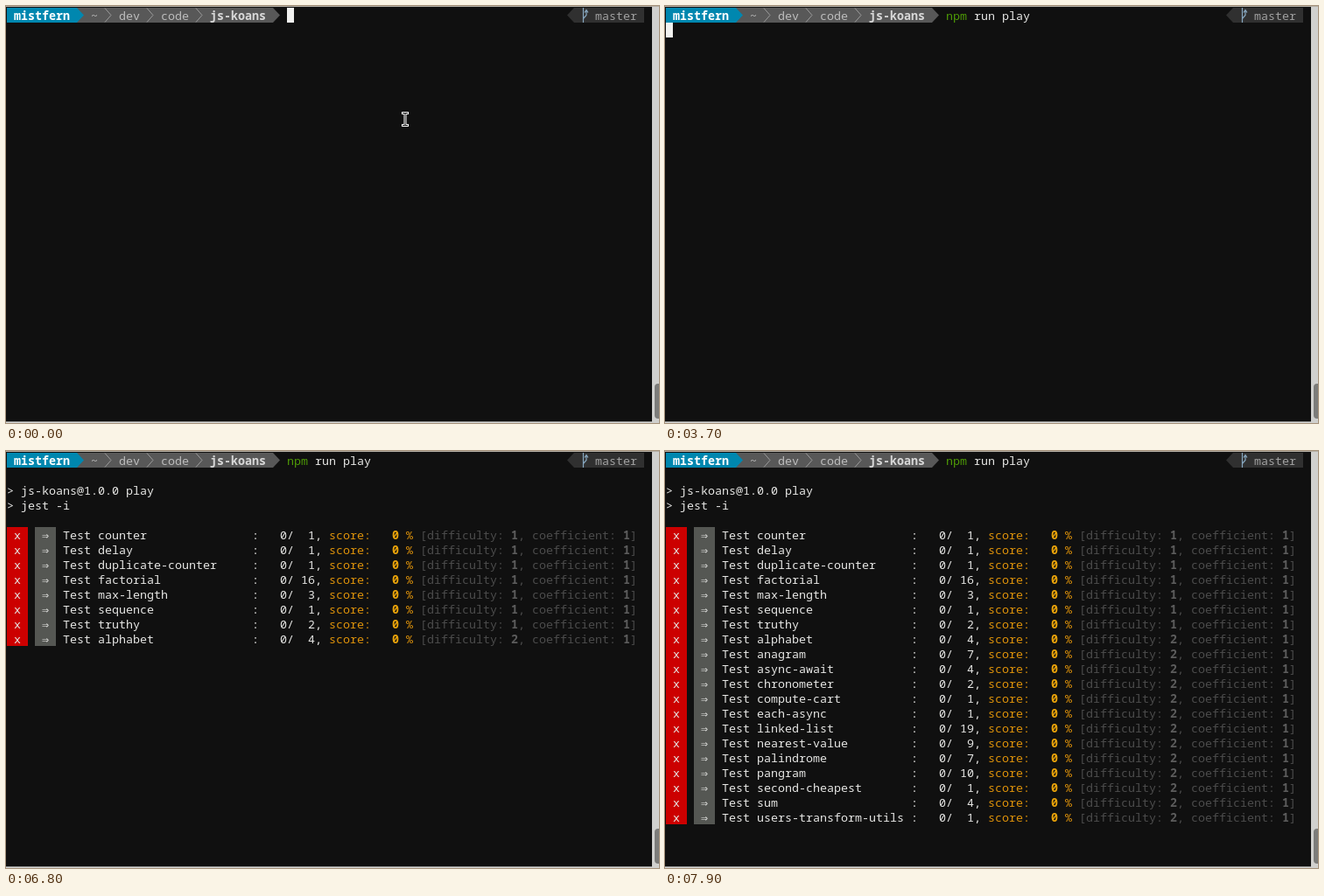
Recreate the animation shown at these times as an HTML page. Size 746 by 477 pixels, loop 8000 ms.

```html
<!DOCTYPE html>
<html lang="en">
<head>
<meta charset="utf-8">
<title>Terminal test run</title>
<style>
html, body { margin: 0; width: 100%; height: 100%; overflow: hidden; background: #101010; }
#stage { position: relative; width: 746px; height: 477px; overflow: hidden; background: #101010;
  font: 13.3333px/18px "Noto Sans Mono", "DejaVu Sans Mono", monospace; color: #e6e6e4; }
#stage > * { position: absolute; }
#stage svg { left: 0; top: 0; }
.cell { position: absolute; height: 17px; white-space: pre; }
.row { left: 0; top: 0; }
.b { font-weight: 700; }
.user { color: #fff; font-weight: 700; }
.path { color: #bcbcbc; }
.here { color: #d8d8d8; font-weight: 700; }
.branch { color: #a0a0a0; }
.ok { color: #4e9a06; }
.bad { color: #ef2929; font-weight: 700; }
.fail { background: #cc0000; }
.mark { width: 24px; background: #555753; text-align: center;
  font-family: "DejaVu Sans Mono", monospace; line-height: 20px; }
.score { color: #dd920a; }
.val { color: #eba40a; font-weight: 700; }
.dim { color: #4c4c4c; }
.dim b { color: #5c5c5c; }
#cursor { width: 8px; height: 17px; background: #f2f2f0; }
.top { left: 0; top: 0; width: 746px; height: 1px; background: #b5afa5; }
.bottom { left: 0; top: 475px; width: 746px; height: 2px; background: linear-gradient(#8c8c8a 50%, #d6d6d4 50%); }
.bar { left: 738px; top: 1px; width: 8px; height: 476px; background: #d0d0ce; }
.thumb { left: 741px; top: 432px; width: 8px; height: 40px; border-radius: 4px; background: #7c7c7a; }
</style>
</head>
<body>
<div id="stage">
  <svg width="746" height="477">
    <path fill="#585858" d="M81 2H305L313 10.5L305 19H81z"/>
    <path fill="#0087af" d="M1 2H81L89 10.5L81 19H1z"/>
    <path fill="none" stroke="#9a9a9a" d="M113 2.5l7 8l-7 8M161 2.5l7 8l-7 8M217 2.5l7 8l-7 8"/>
    <path fill="#303030" d="M729 2H649L641 10.5L649 19H729z"/>
    <path fill="none" stroke="#87a7bf" stroke-width="1.2"
      d="M659.5 2V19M659.5 14.5L663 10.5V5M661 7.5L663 4.5L665 7.5"/>
  </svg>
  <svg id="pointer" width="746" height="477">
    <path fill="none" stroke="#fff" stroke-width="3" d="M452 122.5h8M452 136.5h8M456 122v15"/>
    <path fill="none" stroke="#101010" d="M453 122.5h6M453 136.5h6M456 122v15"/>
  </svg>
  <div id="cursor"></div>
  <div class="bottom"></div>
  <div class="bar"></div>
  <div class="thumb"></div>
  <div class="top"></div>
</div>
<script>
const LOOP = 8000, COMMAND = 'npm run play', FIRST_ROW = 5;
const stage = document.getElementById('stage');
const cursor = document.getElementById('cursor');
const pointer = document.getElementById('pointer');
const colX = col => 1 + col * 8 + 'px';
const rowY = row => 2 + row * 17 + 'px';

function put(row, col, html, cls = '', parent = stage) {
  const el = document.createElement('span');
  el.className = 'cell ' + cls;
  el.style.left = colX(col);
  el.style.top = rowY(row);
  el.innerHTML = html;
  parent.insertBefore(el, parent === stage ? cursor : null);
  return el;
}

function group() {
  const el = document.createElement('div');
  el.className = 'row';
  stage.insertBefore(el, cursor);
  return el;
}

put(0, 1, 'mistfern', 'user');
put(0, 12, '~', 'path');
put(0, 16, 'dev', 'path');
put(0, 22, 'code', 'path');
put(0, 29, 'js-koans', 'here');
put(0, 84, 'master', 'branch');

const program = put(0, 40, '');
const args = put(0, 43, '');
const banner = group();
put(2, 0, '&gt; js-koans@1.0.0 play', '', banner);
put(3, 0, '&gt; jest -i', '', banner);
const notice = put(FIRST_ROW, 0, 'Determining test suites to run...', 'b');

// name, number of checks; difficulty is 2 from the eighth test on
const tests = `counter 1,delay 1,duplicate-counter 1,factorial 16,max-length 3,sequence 1,truthy 2,
alphabet 4,anagram 7,async-await 4,chronometer 2,compute-cart 1,each-async 1,linked-list 19,
nearest-value 9,palindrome 7,pangram 10,second-cheapest 1,sum 4,users-transform-utils 1`
  .split(',').map((entry, i) => {
    const [name, total] = entry.trim().split(' ');
    const line = group();
    const add = (col, html, cls) => put(FIRST_ROW + i, col, html, cls, line);
    add(0, ' x ', 'fail');
    add(4, '⇒', 'mark');
    add(8, 'Test ' + name);
    add(35, ':   0/' + total.padStart(3) + ',');
    add(46, 'score:', 'score');
    add(55, '0', 'val');
    add(57, '%', 'score');
    add(59, `[difficulty: <b>${i < 7 ? 1 : 2}</b>, coefficient: <b>1</b>]`, 'dim');
    return line;
  });

// Each step changes part of the state; cur is [row, col] or null when hidden.
const typed = n => ({ typed: n, cur: [0, 40 + n] });
const done = (n, blink) => ({ done: n, cur: blink ? [FIRST_ROW + n, 0] : null });
const steps = [
  [0, { ...typed(0), pointer: true, banner: false, notice: false, done: 0 }],
  [600, typed(1)], [700, { pointer: false }],
  [1000, typed(2)], [1100, typed(3)], [1500, typed(4)], [1900, typed(5)],
  [2100, typed(7)], [2400, typed(8)], [2600, typed(9)], [2700, typed(10)],
  [2900, typed(11)], [3000, typed(12)],
  [3600, { cur: null }], [3700, { cur: [1, 0] }],
  [4200, { banner: true, cur: null }], [4300, { cur: [FIRST_ROW, 0] }],
  [4800, { cur: null }],
  [5400, { notice: true, cur: [FIRST_ROW, 33] }], [5500, { cur: null }],
  [5800, { notice: false }],
  [6100, done(1)], [6200, done(1, true)], [6300, done(3)], [6400, done(4, true)],
  [6600, done(5, true)], [6700, done(6)], [6800, done(8)], [6900, done(9, true)],
  [7000, done(10)], [7100, done(11, true)], [7200, done(12)], [7300, done(13, true)],
  [7400, done(14, true)], [7500, done(15)], [7600, done(17, true)], [7700, done(18)],
  [7800, done(20, true)], [7900, done(20)]
];

const show = (el, on) => { el.style.visibility = on ? 'visible' : 'hidden'; };

function draw(t) {
  const s = {};
  for (const [at, change] of steps) if (at <= t) Object.assign(s, change);
  const text = COMMAND.slice(0, s.typed);
  program.textContent = text.slice(0, 3);
  program.className = 'cell ' + (s.typed < 3 ? 'bad' : 'ok');
  args.textContent = text.slice(3);
  show(pointer, s.pointer);
  show(banner, s.banner);
  show(notice, s.notice);
  tests.forEach((line, i) => show(line, i < s.done));
  show(cursor, s.cur);
  if (s.cur) {
    cursor.style.top = rowY(s.cur[0]);
    cursor.style.left = colX(s.cur[1]);
  }
}

const start = performance.now();
function tick() {
  draw((performance.now() - start) % LOOP);
  requestAnimationFrame(tick);
}
tick();
</script>
</body>
</html>
```
